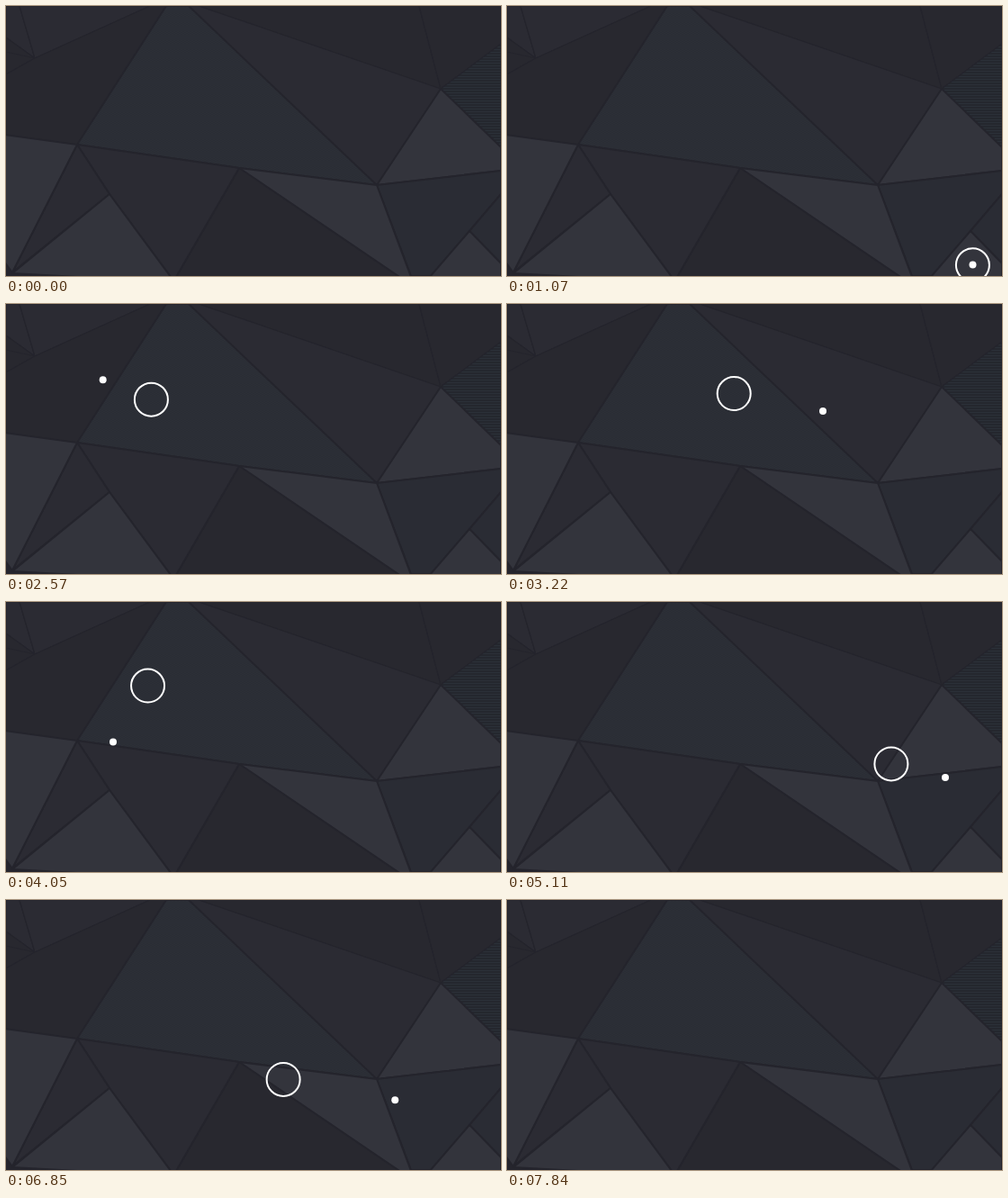
These frames come from a looping animation (550x300 px, 8.4 s). An HTML page:

```html
<!DOCTYPE html>
<html lang="en">
<head>
<meta charset="utf-8">
<title>Cursor follower</title>
<style>
html, body { margin: 0; width: 100%; height: 100%; overflow: hidden; background: #25252d; }
svg { display: block; width: 550px; height: 300px; }
.facets { stroke: #24242c; stroke-width: 2; stroke-linejoin: round; }
.soft { stroke-width: 1.2; }
.dark { fill: #28282f; }
.mid { fill: #2b2b33; }
.light { fill: #33343c; }
.blue { fill: #2a2c34; }
#ring { fill: none; stroke: #fff; stroke-width: 2; }
#dot { fill: #fff; }
</style>
</head>
<body>
<svg viewBox="0 0 550 300">
  <defs>
    <pattern id="weave" width="4" height="2" patternUnits="userSpaceOnUse">
      <rect width="4" height="2" fill="#2c2f37"/>
      <path d="M0 0h2v1h-2zM2 1h2v1h-2z" fill="#2a2d34"/>
    </pattern>
    <pattern id="lines" width="4" height="3" patternUnits="userSpaceOnUse">
      <rect width="4" height="3" fill="#24272e"/>
      <rect width="4" height="1" fill="#2b3038"/>
    </pattern>
  </defs>
  <g class="facets soft">
    <path class="mid" d="M0 0H15L32 58L0 35Z"/>
    <path class="dark" d="M0 35L32 58L0 51ZM0 51L32 58L0 76Z"/>
    <path class="mid" d="M15 0H160L32 58Z"/>
    <path class="dark" d="M0 76L32 58L160 0H178L79 154L0 143Z"/>
    <path class="dark" d="M214 0H459L483 92Z"/>
    <path class="dark" d="M459 0H550V42L483 92Z"/>
    <path class="mid" d="M203 0H214L483 92L412 199Z"/>
    <path fill="url(#lines)" d="M483 92L550 42V157Z"/>
  </g>
  <g class="facets">
    <path fill="url(#weave)" d="M178 0H203L412 199L259 180L79 154Z"/>
    <path class="light" d="M483 92L550 157V183L412 199Z"/>
    <path class="blue" d="M412 199L550 183V209L515 250L472 300H450Z"/>
    <path class="blue" d="M550 209V286L515 250Z"/>
    <path class="light" d="M515 250L550 286V301H471Z"/>
    <path class="light" d="M259 180L412 199L450 301H437Z"/>
    <path class="dark" d="M259 180L437 301H189Z"/>
    <path class="mid" d="M79 154L259 180L189 301H183L115 209Z"/>
    <path class="mid" d="M79 154L115 209L7 296Z"/>
    <path class="light" d="M-2 143L79 154L7 296L-2 284Z"/>
    <path class="light" d="M115 209L183 301H80L7 297Z"/>
  </g>
  <circle id="ring" r="18.5"/>
  <circle id="dot" r="4"/>
</svg>
<script>
const LOOP = 8400, SHOW = 420, HIDE = 7840;
const LAG = 130, STEP = 5;   // ring's time constant and sampling step, ms

// Pointer stops: time, x, y
const stops = [
  [420, 511.5, 310], [620, 517.5, 287.5], [1070, 517.5, 287.5],
  [1480, 330, 175], [1890, 330, 175], [2890, 41, 57], [3220, 351, 119],
  [3860, 185, 25], [4050, 119, 155.5], [4270, 401, 209], [4500, 91, 95],
  [5110, 487, 195], [5675, 84, 82], [5960, 398, 192], [6230, 476, 240],
  [6540, 118, 164], [6940, 474, 230], [7060, 476, 236], [7320, 515, 330]
];

function pointer(t) {
  const i = stops.findIndex(s => s[0] > t);
  if (i === 0) return stops[0].slice(1);
  if (i < 0) return stops[stops.length - 1].slice(1);
  const [t0, x0, y0] = stops[i - 1], [t1, x1, y1] = stops[i];
  const e = (1 - Math.cos(Math.PI * (t - t0) / (t1 - t0))) / 2;
  return [x0 + (x1 - x0) * e, y0 + (y1 - y0) * e];
}

// Exponentially weighted mean of where the pointer has been.
function follower(t) {
  let x = 0, y = 0, sum = 0;
  for (let s = STEP / 2; s < LAG * 7; s += STEP) {
    const w = Math.exp(-s / LAG), [px, py] = pointer(t - s);
    x += px * w;
    y += py * w;
    sum += w;
  }
  return [x / sum, y / sum];
}

const dot = document.getElementById('dot');
const ring = document.getElementById('ring');

function place(el, [x, y], shown) {
  el.setAttribute('cx', x.toFixed(2));
  el.setAttribute('cy', y.toFixed(2));
  el.style.visibility = shown ? 'visible' : 'hidden';
}

const start = performance.now();
function draw(now) {
  const t = Math.max(0, now - start) % LOOP;
  const shown = t >= SHOW && t < HIDE;
  place(ring, follower(t), shown);
  place(dot, pointer(t), shown);
  requestAnimationFrame(draw);
}
draw(start);
</script>
</body>
</html>
```
